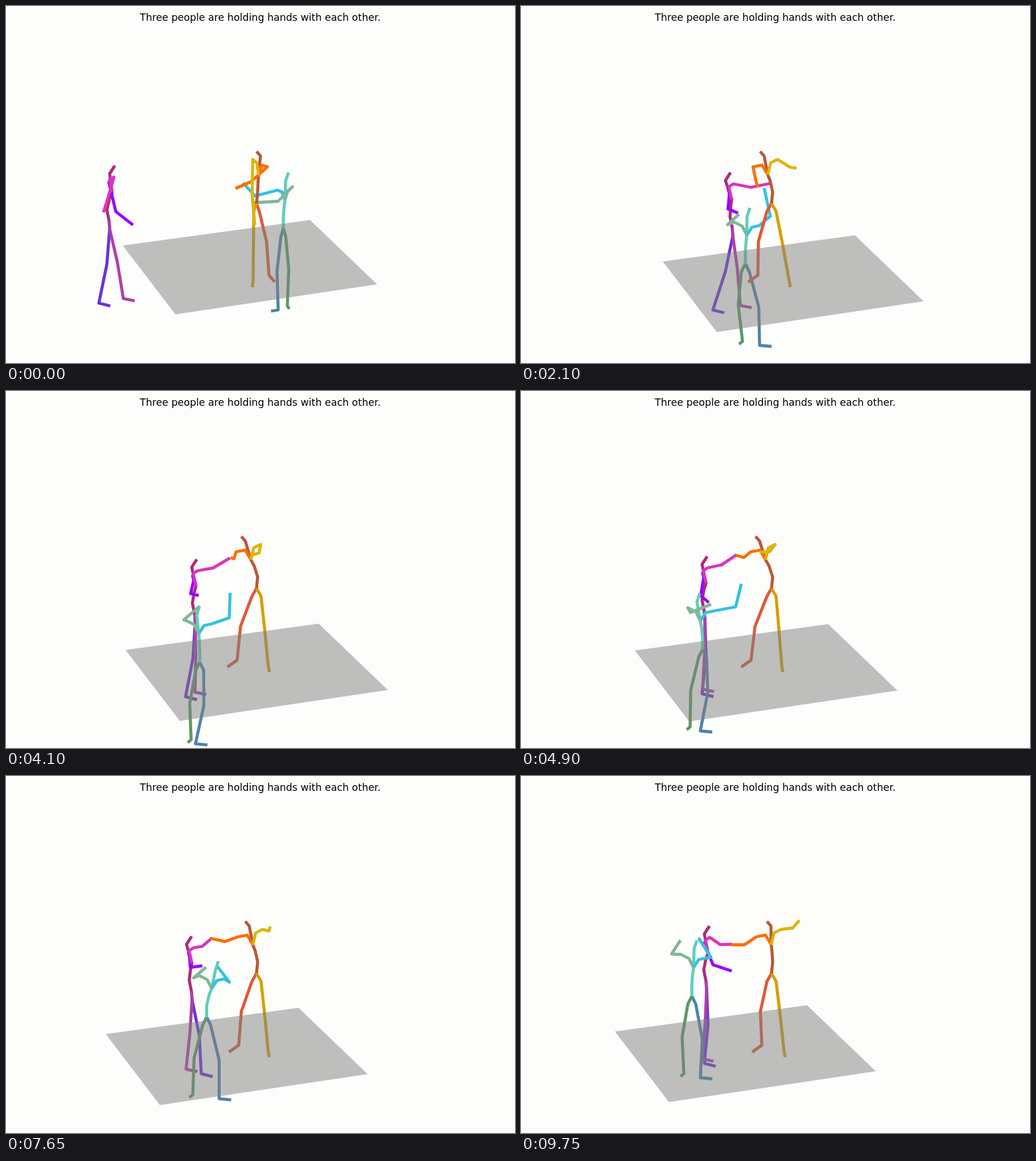
An HTML page with a canvas for the animation above (9.8 s loop, 894 by 626 pixels).

```html
<!DOCTYPE html>
<html lang="en">
<head>
<meta charset="utf-8">
<style>
html, body { margin: 0; overflow: hidden; background: #fdfdfc; }
canvas { display: block; }
</style>
</head>
<body>
<canvas id="stage" width="894" height="626"></canvas>
<script>
const ctx = document.getElementById('stage').getContext('2d');
const LOOP = 9800, STEP = 50;
const times = [0, 2100, 3300, 4900, 6450, 8800, 9750];

// Keyed over time: root (hips), hands, and sway = [neck lean, foot A, foot B].
// Everything else is a fixed body offset; the joints follow in skeleton().
const purple = {
  colors: ['#6B31DB', '#AD40A8', '#AF2B79', '#9B00FF', '#D836C1'],
  root: [[181,377], [370,389], [345,397], [322,387], [325,393], [326,362], [325,360]],
  sway: [[1,-18,25], [-12,-34,14], [-8,-25,4], [-4,-4,-3], [-12,31,-14], [-4,-2,-4], [-3,-3,-7]],
  handA: [[223,384], [380,363], [355,348], [330,371], [360,370], [332,303], [370,342]],
  handB: [[171,362], [437,311], [411,302], [379,287], [369,304], [359,266], [371,295]],
  bow: -4, chest: 5, nod: [9, -14],
  legA: { hip: 1, knee: 5, ankle: 144, toe: [20, 5] },
  legB: { hip: 1, knee: 2, ankle: 136, toe: [20, 4] },
  armA: { collar: [-6, -18], shoulder: [-4, -10], bend: [-12, 5] },
  armB: { collar: [-5, -22], shoulder: [3, -27], bend: [0, -7] }
};

const teal = {
  colors: ['#4D84AA', '#5B9965', '#61CEB9', '#34C1E2', '#80B79A'],
  root: [[487,390], [393,452], [367,460], [319,453], [327,437], [365,407], [300,386]],
  sway: [[4,-9,7], [3,25,-5], [2,-6,-9], [-10,-4,-22], [9,0,-34], [17,39,-13], [4,15,-14]],
  handA: [[416,310], [426,319], [403,337], [387,338], [380,377], [356,285], [312,284]],
  handB: [[433,345], [382,365], [354,347], [334,374], [360,371], [330,298], [280,288]],
  bow: 0, chest: 1, nod: [5, -15], turns: true,
  legA: { hip: 7, knee: 11, ankle: 143, toe: [21, 2] },
  legB: { hip: -7, knee: -10, ankle: 136, toe: [-6, 5] },
  armA: { collar: [9, -14], shoulder: [22, -17], bend: [26, 8] },
  armB: { collar: [-8, -16], shoulder: [-22, -23], bend: [-27, 0] }
};

const orange = {
  colors: ['#DD5A37', '#D69E00', '#B75A39', '#FF6D00', '#DDB50E'],
  root: times.map(() => [440, 346]),
  sway: [[7,22,-6], [-13,-24,31], [-18,-31,25], [-21,-36,18], [-24,-35,25], [-1,-26,16], [-1,-17,22]],
  handA: [[403,320], [416,318], [412,301], [377,288], [368,304], [355,268], [369,296]],
  handB: [[437,384], [484,285], [453,292], [419,283], [420,292], [505,237], [489,253]],
  bow: 2, chest: 0, nod: [-7, -8], turns: true,
  legA: { hip: -8, knee: -11, ankle: 126, toe: [-17, 12] },
  legB: { hip: 8, knee: 4, ankle: 136, toe: [2, 11] },
  armA: { collar: [-10, -17], shoulder: [-26, -14], bend: [-12, 0] },
  armB: { collar: [5, -21], shoulder: [17, -27], bend: [13, -8] }
};

const floorCorner = [[205,420], [248,448], [222,453], [200,455], [185,460], [167,445], [165,448]];
const floorShape = [[0, 0], [338, -46], [459, 70], [95, 124]];

// Smooth curve through unevenly spaced keys.
function tween(keys, t) {
  const last = times.length - 1;
  let i = 0;
  while (i < last - 1 && t >= times[i + 1]) i++;
  const span = times[i + 1] - times[i], u = (t - times[i]) / span;
  const slope = (k, c) => {
    const a = Math.max(0, k - 1), b = Math.min(last, k + 1);
    return (keys[b][c] - keys[a][c]) / (times[b] - times[a]) * span;
  };
  return keys[i].map((p, c) => {
    const q = keys[i + 1][c], m = slope(i, c), n = slope(i + 1, c);
    return p + u * (m + u * (3 * (q - p) - 2 * m - n + u * (2 * (p - q) + m + n)));
  });
}

const bump = (t, center, width) => Math.exp(-(((t - center) / width) ** 2));

// Sideways scale of the body while someone turns round at the start.
function facing(t) {
  const u = Math.min(1, t / 1600);
  return -.6 + 1.6 * u * u * (3 - 2 * u);
}

function skeleton(person, t, raise) {
  const [x, y] = tween(person.root, t);
  const [lean, stepA, stepB] = tween(person.sway, t);
  const turn = person.turns ? facing(t) : 1;
  const { bow, nod } = person;
  const sway = lean / 2 + person.chest;
  const chest = [x + sway, y - 50];

  const leg = ({ hip, knee, ankle, toe }, step) => [
    [x, y],
    [x + hip * turn, y + 14],
    [x + step / 2 + knee * turn, y + ankle * .53],
    [x + step, y + ankle],
    [x + step + toe[0] * turn, y + ankle + toe[1]]];

  const arm = ({ collar, shoulder, bend }, hand) => {
    const from = (p, [dx, dy]) => [p[0] + dx * turn, p[1] + dy];
    const middle = [(chest[0] + hand[0]) / 2, (chest[1] + hand[1]) / 2];
    return [chest, from(chest, collar), from(chest, shoulder), from(middle, bend), hand];
  };

  const spine = [
    [x, y], [x + bow, y - 20], [x + (bow + sway) / 2, y - 39], chest,
    [x + lean, y - 83], [x + lean + nod[0], y - 83 + nod[1]]];
  const [bx, by] = tween(person.handB, t);
  return [
    leg(person.legA, stepA), leg(person.legB, stepB), spine,
    arm(person.armA, tween(person.handA, t)), arm(person.armB, [bx, by - raise])];
}

function trace(points) {
  ctx.beginPath();
  points.forEach(p => ctx.lineTo(...p));
}

function drawPerson(person, t, dx = 0, dy = 0, raise = 0) {
  ctx.save();
  ctx.translate(dx, dy);
  skeleton(person, t, raise).forEach((limb, i) => {
    ctx.strokeStyle = person.colors[i];
    trace(limb);
    ctx.stroke();
  });
  ctx.restore();
}

function drawFloor(t, drift) {
  const [x, y] = tween(floorCorner, t);
  const scale = 1 + (y - 450) * .0009;
  // Translucent, so it tints whatever it covers.
  ctx.fillStyle = 'rgba(128, 128, 128, .5)';
  trace(floorShape.map(([dx, dy]) => [x + drift + dx * scale, y + dy * scale]));
  ctx.fill();
}

function draw(t) {
  const drift = 30 * bump(t, 1200, 500) - 13 * bump(t, 2750, 300);
  ctx.fillStyle = '#fdfdfc';
  ctx.fillRect(0, 0, 894, 626);
  ctx.lineWidth = 5.3;
  ctx.lineJoin = 'round';
  drawPerson(purple, t, drift);
  drawPerson(teal, t, drift, 18 * bump(t, 4050, 300));
  drawPerson(orange, t, 0, 0, 105 * bump(t, 1250, 350));
  drawFloor(t, drift);

  ctx.fillStyle = '#000';
  ctx.font = '17.45px "DejaVu Sans", sans-serif';
  ctx.textAlign = 'center';
  ctx.fillText('Three people are holding hands with each other.', 446.5, 26);
}

const start = performance.now();
function loop() {
  const t = (performance.now() - start) % LOOP;
  draw(Math.floor(t / STEP) * STEP);
  requestAnimationFrame(loop);
}
loop();
</script>
</body>
</html>
```
